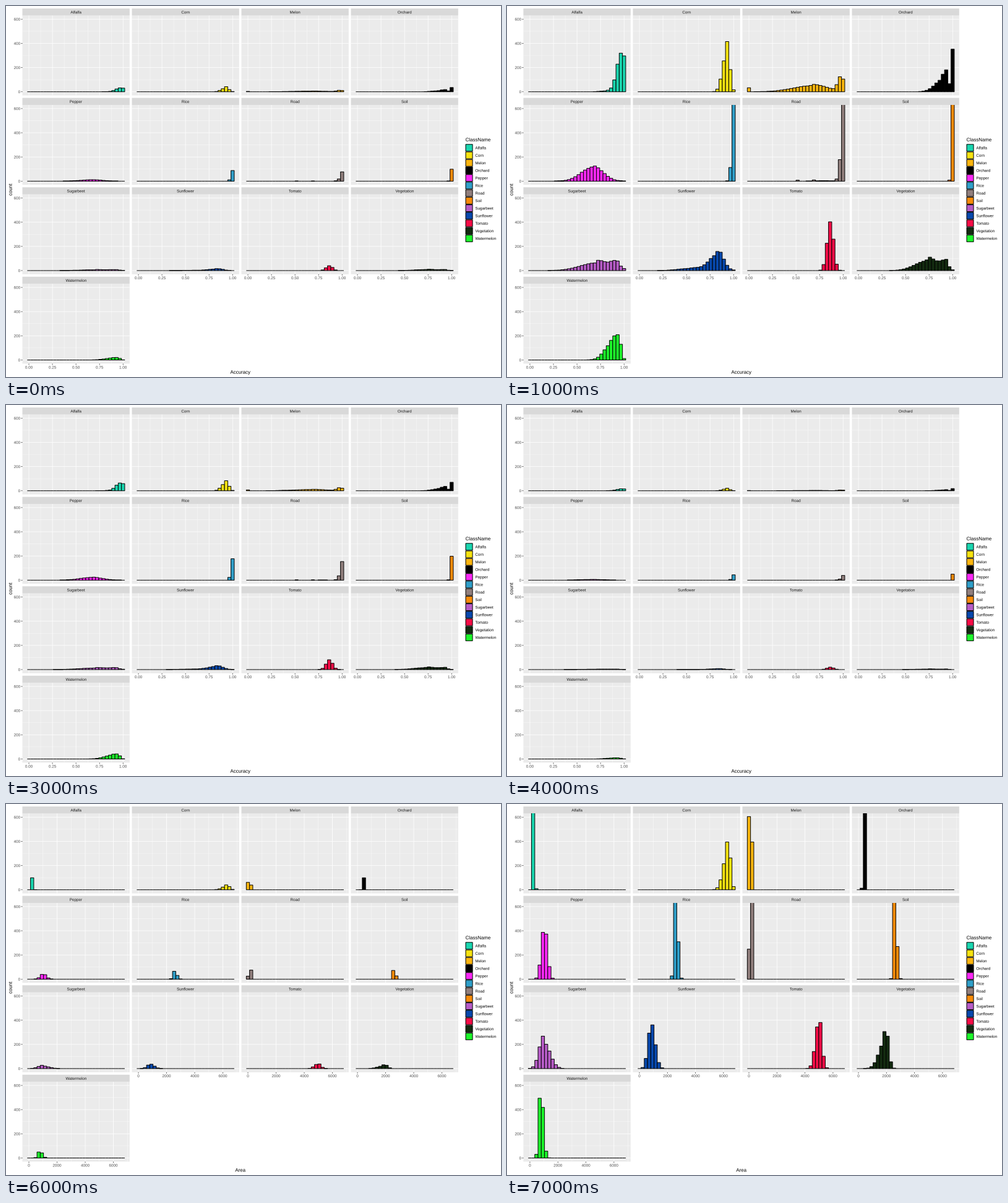
Recreate the animation shown at these times as a matplotlib script. Size 800 by 600 pixels, loop 8000 ms.

```python
import math
import numpy as np
import matplotlib.pyplot as plt
from matplotlib.animation import FuncAnimation
from matplotlib.collections import LineCollection, PolyCollection
from matplotlib.patches import PathPatch, Rectangle
from matplotlib.textpath import TextPath
from matplotlib.transforms import Affine2D

plt.rcParams["font.family"] = "Liberation Sans"

W, H, DPI = 800, 600, 100
PX = 72 / DPI                      # points per pixel
BINS, BIN = 30, 5.25               # histogram bins and their width in pixels
SPAN = BIN * (BINS - 1)            # from the first to the last bin centre
PANEL_W, PANEL_H = 173.3, 129.2
STEP_X, STEP_Y = 177.0, 144.6
LEFT, TOP, ZERO_X, ZERO_Y = 26.5, 15.4, 37.0, 138.7
UNIT = 117.4 / 600                 # pixels per count
KEY = 12.21                        # legend key pitch
SMALL, LARGE = 6.32, 7.9           # text sizes in pixels
GREY = "#4D4D4D"

# measure, sample size, axis value at the last bin centre
SCENES = [("Accuracy", 100, 1), ("Accuracy", 1000, 1), ("Accuracy", 1500, 1),
          ("Accuracy", 200, 1), ("Accuracy", 50, 1), ("Accuracy", 500, 1),
          ("Area", 100, 6692), ("Area", 1000, 6725)]

# Every class is a mix of bell curves (share, median, left sd, right sd) for
# accuracy and one bell (median, left sd, right sd) for area, in bin units.
CLASSES = [
    ("Alfalfa", "#1AD6AF", [(.96, 27.95, 1.25, 1.1), (.04, 24, 2, 1.2)],
     (1.1, .17, .17)),
    ("Corn", "#F7E311", [(1, 26.85, 1.2, .77)], (27.1, 1.25, .72)),
    ("Melon", "#FBB50F", [(.033, 0, .1, .1), (.717, 19.3, 5.8, 4.6),
                          (.25, 28.2, .8, .8)], (.42, .3, .3)),
    ("Orchard", "#000000", [(.66, 26.2, 2.45, 1.1), (.34, 29.2, .1, .1)],
     (1.9, .18, .18)),
    ("Pepper", "#FA28F5", [(1, 19.27, 3.5, 3.1)], (4.47, .85, .85)),
    ("Rice", "#309FC9", [(1, 29.22, .6, .6)], (11.25, .39, .53)),
    ("Road", "#917F7D", [(.964, 29.16, .79, .79), (.02, 23, 3, 3),
                         (.008, 15, .2, .2), (.008, 20, .2, .2)],
     (.67, .25, .25)),
    ("Soil", "#FA8B08", [(1, 29.3, .34, .34)], (11.2, .27, .5)),
    ("Sugarbeet", "#B65CC6", [(.8, 20.6, 5, 3.6), (.2, 26.4, 1.4, 1.1)],
     (4.35, 1.35, 1.85)),
    ("Sunflower", "#0748AC", [(.82, 23.95, 2.5, 1.8), (.18, 16, 4, 3)],
     (3.78, .97, 1.08)),
    ("Tomato", "#F50D47", [(1, 25.07, .98, .9)], (21.48, 1.01, .83)),
    ("Vegetation", "#132B10", [(.78, 21.3, 3.8, 2.7), (.22, 26.5, 1.3, .9)],
     (8.1, 1.75, .9)),
    ("Watermelon", "#1DF82B", [(.75, 25.15, 2.2, 1.4), (.25, 27.4, .7, .55)],
     (3.46, .51, .66)),
]


def below(x, median, left, right):
    """Part of a two-sided bell that lies below x."""
    z = (x - median) / (left if x < median else right)
    return (1 + math.erf(z / math.sqrt(2))) / 2


def shares(bells):
    """Part of the sample in every bin; the outer bins take the overflow."""
    edges = np.arange(1, BINS) - 0.5
    cdf = [sum(s * below(x, *bell) for s, *bell in bells) for x in edges]
    return np.diff([0, *cdf, 1])


fig = plt.figure(figsize=(W / DPI, H / DPI), dpi=DPI, facecolor="white")
ax = fig.add_axes([0, 0, 1, 1])
ax.set_xlim(0, W)
ax.set_ylim(H, 0)
ax.axis("off")


def box(x, y, w, h, color, z, **kw):
    return ax.add_patch(Rectangle((x, y), w, h, facecolor=color, zorder=z,
                                  snap=False, **kw))


def outline(x, y, s, size=SMALL, align=0.5, angle=0):
    """Outline of a text; align is 0 for left, 0.5 for centre, 1 for right."""
    path = TextPath((0, 0), s, size=size)
    ink = path.get_extents()
    shift = Affine2D().translate(-ink.x0 - align * ink.width if align else 0, 0)
    return path.transformed(shift.scale(1, -1).rotate_deg(-angle).translate(x, y))


def text(x, y, s, color="black", **kw):
    return ax.add_patch(PathPatch(outline(x, y, s, **kw), facecolor=color, lw=0,
                                  zorder=6, snap=False))


def lines(color, width, z):
    group = LineCollection([], colors=color, linewidths=width * PX, zorder=z,
                           capstyle="butt")
    group.set_snap(False)
    return ax.add_collection(group, autolim=False)


class Panel:
    def __init__(self, index, name, color, accuracy, area):
        row, col = divmod(index, 4)
        self.shares = {"Accuracy": shares(accuracy), "Area": shares([(1, *area)])}
        self.x, self.y = LEFT + col * STEP_X, TOP + row * STEP_Y
        self.x0, self.y0 = ZERO_X + col * STEP_X, ZERO_Y + row * STEP_Y
        back = box(self.x, self.y, PANEL_W, PANEL_H, "#EBEBEB", 1, lw=0)
        box(self.x, self.y - 11.4, PANEL_W, 11.4, "#D9D9D9", 1, lw=0)
        text(self.x + PANEL_W / 2, self.y - 3.2, name, "#1A1A1A")
        self.bars = PolyCollection([], facecolors=color, edgecolors="black",
                                   linewidths=PX, joinstyle="miter", zorder=4)
        self.bars.set_snap(False)
        ax.add_collection(self.bars, autolim=False)
        self.bars.set_clip_path(back)

    def rows(self, values):
        return [[(self.x, self.y0 - v * UNIT), (self.x + PANEL_W, self.y0 - v * UNIT)]
                for v in values]

    def columns(self, values, top_value):
        xs = [self.x0 + SPAN * v / top_value for v in values]
        return [[(x, self.y), (x, self.y + PANEL_H)] for x in xs]

    def show(self, measure, size):
        quads = []
        for k, n in enumerate(np.round(self.shares[measure] * size)):
            a = self.x0 + (k - 0.5) * BIN
            b, top = a + BIN, self.y0 - n * UNIT
            quads.append([(a, self.y0), (a, top), (b, top), (b, self.y0)])
        self.bars.set_verts(quads)


panels = [Panel(i, *c) for i, c in enumerate(CLASSES)]
minor = lines("white", 0.4, 2)
major = lines("white", 0.8, 3)
ticks = lines("#333333", 0.8, 3)

# y axes
y_ticks = []
for p in panels[::4]:
    for v in (0, 200, 400, 600):
        y = p.y0 - v * UNIT
        y_ticks.append([(LEFT - 2, y), (LEFT, y)])
        text(LEFT - 3.6, y + 2.3, str(v), GREY, align=1)
text(9.7, 297, "count", size=LARGE, angle=90)

# the lowest panel of every column carries the x axis
bottoms = panels[-4:]
x_labels = [[text(0, 0, "0", GREY) for _ in range(5)] for _ in bottoms]
x_title = text(0, 0, "0")

# legend
text(742.5, 218.8, "ClassName", size=LARGE, align=0)
for i, (name, color, *_) in enumerate(CLASSES):
    y = 223.2 + i * KEY
    box(742.4, y, KEY, KEY, "#F2F2F2", 1, lw=0)
    box(743, y + 0.6, KEY - 1.2, KEY - 1.2, color, 2, edgecolor="black", lw=PX)
    text(758.3, y + KEY / 2 + 2.3, name, align=0)


def update(i):
    measure, size, top_value = SCENES[i]
    if measure == "Accuracy":
        marks, step, form = np.arange(5) / 4, 0.25, "{:.2f}"
    else:
        marks, step, form = np.arange(4) * 2000, 2000, "{:.0f}"
    halves = marks + step / 2
    halves = halves[halves < top_value * 1.05]

    thin, thick = [], []
    for p in panels:
        p.show(measure, size)
        thin += p.rows((100, 300, 500)) + p.columns(halves, top_value)
        thick += p.rows((0, 200, 400, 600)) + p.columns(marks, top_value)
    minor.set_segments(thin)
    major.set_segments(thick)

    x_ticks = []
    for p, labels in zip(bottoms, x_labels):
        base = p.y + PANEL_H
        for k, label in enumerate(labels):
            label.set_visible(k < len(marks))
        for label, v in zip(labels, marks):
            x = p.x0 + SPAN * v / top_value
            x_ticks.append([(x, base), (x, base + 2)])
            label.set_path(outline(x, base + 8.1, form.format(v)))
    ticks.set_segments(y_ticks + x_ticks)
    x_title.set_path(outline(378.7, 594.7, measure, size=LARGE))
    return []


anim = FuncAnimation(fig, update, frames=len(SCENES), interval=1000,
                     repeat=True, repeat_delay=0, blit=False)
plt.show()
```
